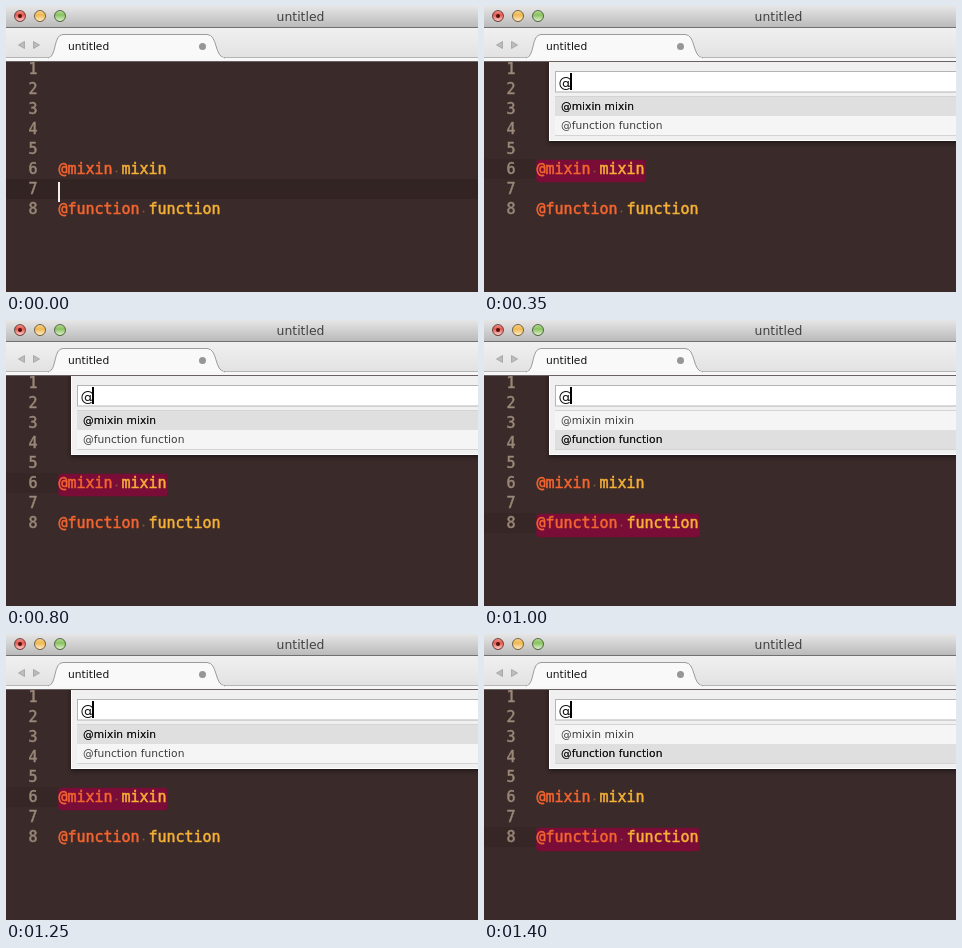
An HTML page that plays this animation: 472x286 px, repeating every 1.5 s.

```html
<!DOCTYPE html>
<html lang="en">
<head>
<meta charset="utf-8">
<title>Symbol list</title>
<style>
  html, body { margin: 0; width: 100%; height: 100%; overflow: hidden; background: #3a2a2a; }
  svg { display: block; width: 472px; height: 286px; }
  text { white-space: pre; }
  .ui { font-family: "DejaVu Sans", sans-serif; font-size: 10.7px; fill: #111; }
  .title { font-size: 12.4px; fill: #404040; text-anchor: middle; }
  .code { font: 15px "DejaVu Sans Mono", monospace; letter-spacing: -.03px; stroke-width: .5px; }
  .num { fill: #9a8878; stroke: #9a8878; }
  .key { fill: #f4652f; stroke: #f4652f; }
  .name { fill: #f6b136; stroke: #f6b136; }
  .space { fill: #80573f; }
  .sel { fill: #790d37; stroke: #790d37; stroke-opacity: .5; }

  .idle, .list, .first, .second { animation: 1500ms step-end infinite; }
  .idle { animation-name: idle; }
  .list { animation-name: list; }
  .first { animation-name: first; }
  .second { animation-name: second; }
  @keyframes idle { 0% { opacity: 1 } 13.333%, 100% { opacity: 0 } }
  @keyframes list { 0% { opacity: 0 } 13.333%, 100% { opacity: 1 } }
  @keyframes first {
    0% { opacity: 0 } 13.333% { opacity: 1 } 63.333% { opacity: 0 }
    76.667% { opacity: 1 } 90%, 100% { opacity: 0 }
  }
  @keyframes second {
    0% { opacity: 0 } 63.333% { opacity: 1 }
    76.667% { opacity: 0 } 90%, 100% { opacity: 1 }
  }
</style>
</head>
<body>
<svg viewBox="0 0 472 286">
  <defs>
    <linearGradient id="bar" x2="0" y2="1">
      <stop stop-color="#e6e6e6"/><stop offset="1" stop-color="#b8b8b8"/>
    </linearGradient>
    <linearGradient id="strip" x2="0" y2="1">
      <stop stop-color="#f0f0f0"/><stop offset="1" stop-color="#e2e2e2"/>
    </linearGradient>
    <linearGradient id="shine" x2="0" y2="1">
      <stop stop-color="#fff" stop-opacity=".4"/><stop offset=".4" stop-color="#fff" stop-opacity=".1"/>
      <stop offset="1" stop-color="#fff" stop-opacity=".75"/>
    </linearGradient>
    <filter id="soft" x="-5%" y="-15%" width="110%" height="140%">
      <feDropShadow dx="0" dy="2" stdDeviation="2" flood-opacity=".45"/>
    </filter>
  </defs>

  <rect width="472" height="286" fill="#3a2a2a"/>

  <!-- current line and selection -->
  <rect class="idle" y="173" width="472" height="20" fill="#332424"/>
  <g class="first">
    <rect y="153" width="52" height="20" fill="#362626"/>
    <rect class="sel" x="52.5" y="154" width="109" height="22" rx="3"/>
  </g>
  <g class="second">
    <rect y="193" width="52" height="20" fill="#362626"/>
    <rect class="sel" x="52.5" y="194" width="163" height="23" rx="3"/>
  </g>

  <g id="numbers" class="code num"></g>
  <text class="code" x="52.5" y="168"><tspan class="key">@mixin</tspan> <tspan class="name">mixin</tspan></text>
  <text class="code" x="52.5" y="208"><tspan class="key">@function</tspan> <tspan class="name">function</tspan></text>
  <circle class="space" cx="110.500" cy="165.500" r="1"/>
  <circle class="space" cx="137.500" cy="205.500" r="1"/>
  <rect class="idle" x="52" y="176" width="2" height="20" fill="#f4eeee"/>

  <!-- symbol list -->
  <g class="list ui">
    <rect x="65" y="50" width="420" height="85" fill="#f0f0f0" filter="url(#soft)"/>
    <path d="M65.500 56V134.500H472" fill="none" stroke="#fff"/>
    <rect x="71.5" y="65.5" width="410" height="20.500" fill="#fff" stroke="#b4b4b4"/>
    <text x="74.500" y="81.500" font-size="14.500">@</text>
    <rect x="86" y="67" width="2" height="17" fill="#000"/>
    <rect x="71" y="91" width="401" height="38" fill="#f5f5f5"/>
    <rect class="first" x="71" y="91" width="401" height="19" fill="#dfdfdf"/>
    <rect class="second" x="71" y="110" width="401" height="19" fill="#dfdfdf"/>
    <path d="M71 90.5H472M71 129.5H472" stroke="#d4d4d4"/>
    <g fill="#3c3c3c">
      <text x="77" y="104">@mixin mixin</text>
      <text x="77" y="123">@function function</text>
    </g>
    <text class="first" x="77" y="104">@mixin mixin</text>
    <text class="second" x="77" y="123">@function function</text>
  </g>

  <!-- tab strip -->
  <rect y="22" width="472" height="30" fill="url(#strip)"/>
  <rect y="51" width="472" height="4" fill="#f7f7f7"/>
  <path d="M0 51.5H472" stroke="#b5b5b5"/>
  <path d="M0 55.5H472" stroke="#6a6262"/>
  <path d="M42 52C51 51 47 28.500 57 28.500H201C212 28.500 208 51 219 52"
        fill="#f9f9f9" stroke="#9c9c9c"/>
  <path d="M43 52.500H218" stroke="#f8f8f8" stroke-width="2"/>
  <path d="M18.500 35.500V42.500L12.500 39ZM27.500 35.500V42.500L33.500 39Z" fill="#bcbcbc" stroke="#a0a0a0" stroke-width=".8"/>
  <text class="ui" x="62" y="44">untitled</text>
  <circle cx="196.500" cy="40.500" r="3.500" fill="#969696"/>

  <!-- title bar -->
  <rect width="472" height="22" fill="url(#bar)"/>
  <path d="M0 21.500H472" stroke="#707070"/>
  <g stroke="#00000080">
    <circle cx="14" cy="10" r="5.500" fill="#e0463b"/>
    <circle cx="34" cy="10" r="5.500" fill="#eeb03c"/>
    <circle cx="54" cy="10" r="5.500" fill="#7cbc4c"/>
  </g>
  <g fill="url(#shine)">
    <circle cx="14" cy="10" r="5"/><circle cx="34" cy="10" r="5"/><circle cx="54" cy="10" r="5"/>
  </g>
  <circle cx="14" cy="10" r="2" fill="#571008"/>
  <text class="ui title" x="294.500" y="15">untitled</text>
</svg>
<script>
  const numbers = document.getElementById("numbers");
  for (let n = 1; n <= 8; n++) {
    const label = document.createElementNS(numbers.namespaceURI, "text");
    label.setAttribute("x", 22.5);
    label.setAttribute("y", 48 + 20 * n);
    label.textContent = n;
    numbers.append(label);
  }
</script>
</body>
</html>
```
